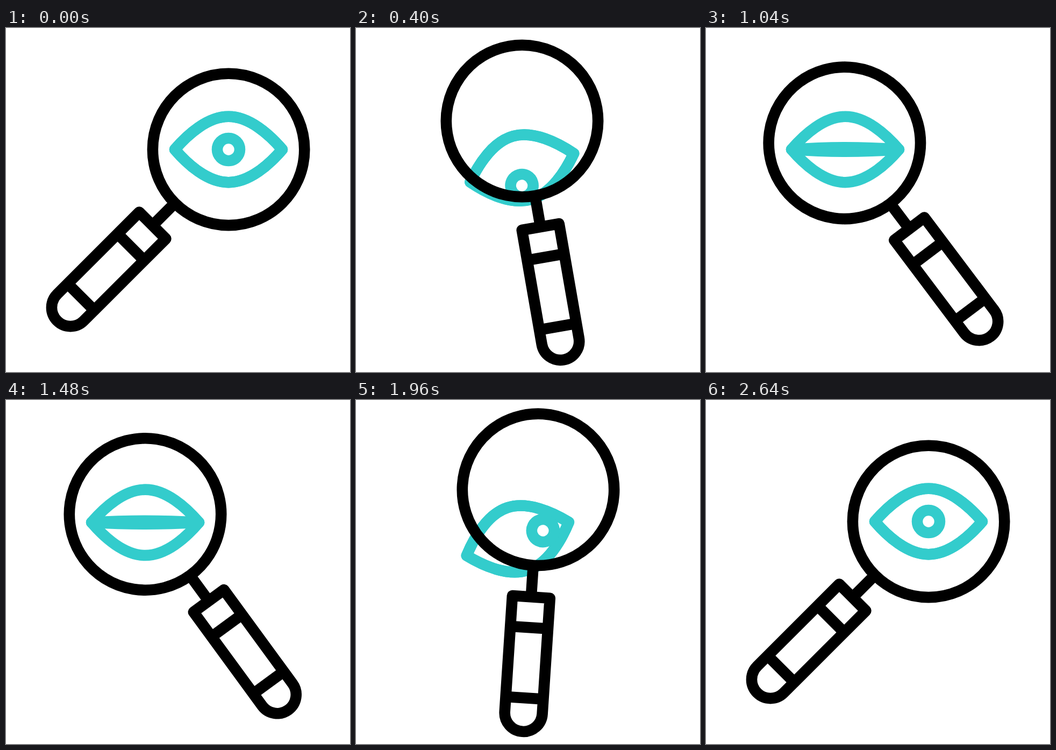
An HTML page that plays this animation: 640 px wide and 640 px high, repeating every 3 s.

```html
<!DOCTYPE html>
<html lang="en">
<head>
<meta charset="utf-8">
<title>Magnifier and eye</title>
<style>
  html, body { margin: 0; width: 100%; height: 100%; overflow: hidden; background: #fff; }
  svg { display: block; width: 100%; height: 100%; }
  g { fill: none; stroke-width: 20.6; stroke-linejoin: round; }
</style>
</head>
<body>
<svg viewBox="0 0 640 640">
  <clipPath id="opening"><path id="gap"/></clipPath>
  <g id="eye" stroke="#33cccc">
    <path id="outline"/>
    <path id="lids"/>
    <g clip-path="url(#opening)"><circle id="pupil" r="21"/></g>
  </g>
  <g id="glass" stroke="#000">
    <circle r="141.2"/>
    <path d="M0 141V200M-35 257H35M-35 388.3H35"/>
    <path d="M-35 416V200H35V416A35 35 0 0 1 -35 416Z"/>
  </g>
</svg>
<script>
const LOOP = 3000;
const $ = id => document.getElementById(id);
const portion = (t, from, to) => Math.min(1, Math.max(0, (t - from) / (to - from)));

// Cubic-bezier easing (a, 0, b, 1), solved by bisection
function bezier(a, b) {
  return (t, from, to) => {
    const x = portion(t, from, to);
    if (x === 0 || x === 1) return x;
    let lo = 0, hi = 1;
    for (let i = 0; i < 24; i++) {
      const s = (lo + hi) / 2;
      const at = 3 * a * s * (1 - s) ** 2 + 3 * b * s * s * (1 - s) + s ** 3;
      if (at < x) lo = s; else hi = s;
    }
    return lo * lo * (3 - 2 * lo);
  };
}
const soft = bezier(0.18, 0.65);
const sharp = bezier(0.81, 0.15);

// Rises from 0 to 1 and falls back within the time span
const bump = (t, from, to, power) => {
  const x = portion(t, from, to);
  return x === 0 || x === 1 ? 0 : Math.sin(Math.PI * x) ** power;
};

// Almond shape; k = 1 is wide open, 0 is shut
const almond = k => {
  const a = 28 * k, b = 61.2 * k;
  return `M-100 0C-76 ${-a} -39 ${-b} 0 ${-b}S76 ${-a} 100 0C76 ${a} 39 ${b} 0 ${b}S-76 ${a} -100 0Z`;
};
$('outline').setAttribute('d', almond(1));

// p is 0 at the right, 1 at the left; bend shifts the wave in its path
function placeGlass(p, bend) {
  const y = 373 + 7 * p - 5 * Math.sin(2 * Math.PI * p ** bend);
  $('glass').setAttribute('transform',
    `translate(${267 + 116 * p} ${y}) rotate(${45 - 82 * p}) translate(0 -208)`);
}

function placeEye(p, tilt, open, lookX, lookY) {
  const dip = 73 * Math.sqrt(p * (1 - p));
  $('eye').setAttribute('transform',
    `translate(${414 - 155 * p} ${226 + dip}) rotate(${tilt})`);
  const shape = almond(open);
  $('lids').setAttribute('d', shape);
  $('gap').setAttribute('d', shape);
  $('pupil').setAttribute('cx', lookX);
  $('pupil').setAttribute('cy', lookY);
}

function draw(t) {
  if (t < 1440) {
    const arc = bump(t, 80, 640, 2);
    placeGlass(soft(t, 90, 640), 1.69);
    placeEye(soft(t, 80, 640), -16.3 * arc, 1 - soft(t, 640, 1120), -9.5 * arc, 33.5 * arc);
  } else {
    placeGlass(1 - soft(t, 1440, 2640), 1.23);
    placeEye(1 - sharp(t, 1440, 2640), -19.2 * bump(t, 1480, 2640, 1.57),
      soft(t, 1440, 1920), 56 * bump(t, 1480, 2640, 3.4), 0);
  }
}

const start = performance.now();
function tick() {
  draw((performance.now() - start) % LOOP);
  requestAnimationFrame(tick);
}
tick();
</script>
</body>
</html>
```
